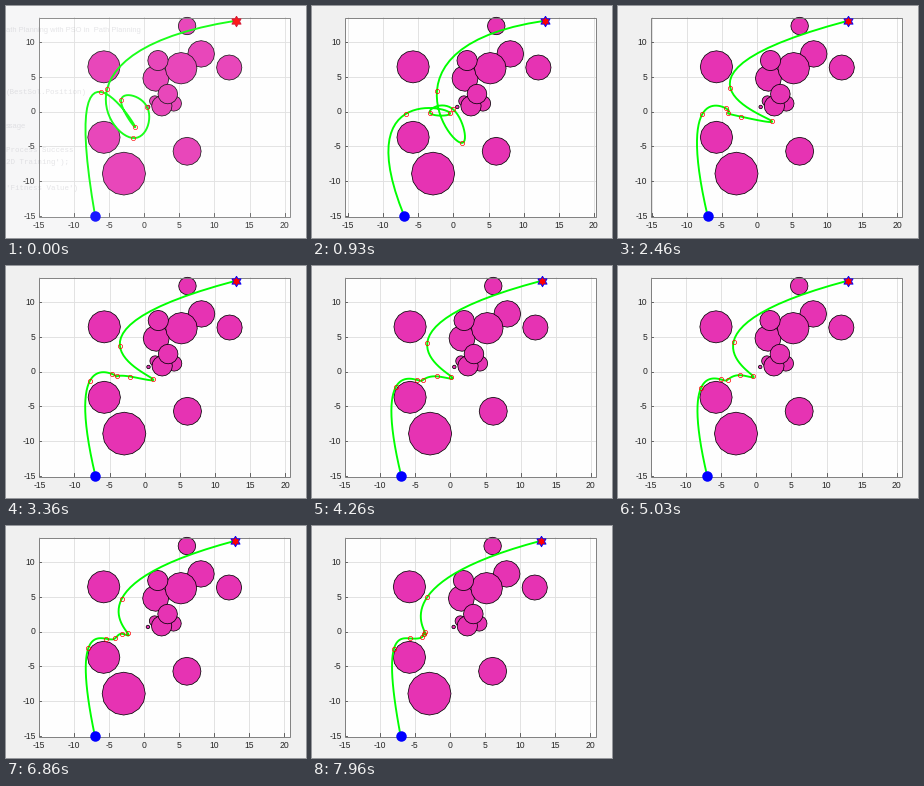
A matplotlib script for the animation above (8 s loop, 300 px wide and 232 px high).

```python
import numpy as np
import matplotlib.pyplot as plt
from matplotlib.animation import FuncAnimation
from matplotlib.patches import Polygon, Rectangle
from matplotlib.transforms import Affine2D

W, H, DPI = 300, 232, 64  # a power of two keeps the pixel size exact
LOOP, STEP = 8000, 20
PX = 72 / DPI
SX, SY, Y0 = 7.02, 6.98, 105.5
LEFT, RIGHT, TOP, BOTTOM = 32.5, 283.5, 11.5, 210.5
START, GOAL = (-7, -15), (13, 13)
PINK, INK = (0.9, 0.2, 0.7), "#262626"

# Obstacles: x, y, radius, from back to front
OBSTACLES = [
    (-5.75, 6.4, 2.3), (-5.75, -3.7, 2.3), (-2.9, -8.9, 3.07),
    (6.1, -5.7, 2.0), (6.1, 12.25, 1.25), (8.1, 8.25, 1.9),
    (12.1, 6.3, 1.8), (1.65, 4.75, 1.85), (5.25, 6.2, 2.25),
    (1.95, 7.3, 1.45), (4.2, 1.15, 1.1), (1.5, 1.5, 0.75),
    (2.5, 0.8, 1.45), (3.35, 2.5, 1.4), (0.55, 0.65, 0.25),
]

# Best way points found by the swarm at a few moments
KEY_TIMES = [0, 930, 1530, 2460, 4260, 5930, 7960]
KEY_POINTS = np.array([
    [(-6.17, 2.8), (-1.3, -2.2), (-3.3, 1.65), (.4, .65), (-1.6, -3.8), (-5.3, 3.2)],
    [(-6.8, -.35), (-.5, -.2), (-3.35, -.2), (-.1, .35), (1.2, -4.5), (-2.35, 2.95)],
    [(-8.5, -1.35), (-1.35, -.35), (-4.35, .2), (-.85, -3.15), (1.15, -4.9), (-4, 2.5)],
    [(-7.75, -.35), (-4.4, .45), (-4.1, -.2), (-2.2, -.75), (2.1, -1.35), (-3.75, 3.3)],
    [(-7.8, -2.25), (-4.8, -1.2), (-3.9, -1.2), (-1.9, -.7), (.15, -.75), (-3.3, 4.1)],
    [(-7.95, -2.4), (-5.4, -1.05), (-4.3, -1.15), (-2.7, -.35), (-1.3, -.4), (-3.2, 4.4)],
    [(-7.95, -2.45), (-5.6, -1.0), (-3.95, -.8), (-3.7, -.3), (-3.55, -.1), (-3.2, 4.95)],
])

# Bursts of iterations: first time, last time, count
BURSTS = [
    (30, 800, 12), (860, 1660, 12), (1730, 2530, 12), (2600, 3100, 8),
    (3360, 3460, 3), (3630, 3960, 6), (4160, 4930, 12), (5000, 5800, 12),
    (5860, 6660, 12), (6730, 7500, 13), (7560, 7960, 7),
]
UPDATES = np.concatenate([np.linspace(*burst) for burst in BURSTS])


def iteration(t):
    return np.searchsorted(UPDATES, t, side="right")


KEY_ITERATIONS = iteration(KEY_TIMES)


def spline_basis(t):
    """Cubic not-a-knot basis for knots 0..7."""
    t = np.asarray(t, float)[:, None]
    return np.hstack([t ** np.arange(4), np.clip(t - np.arange(2, 6), 0, None) ** 3])


SPLINE = spline_basis(np.linspace(0, 7, 100)) @ np.linalg.inv(spline_basis(np.arange(8)))


def way_points(t):
    i = iteration(t)
    flat = KEY_POINTS.reshape(len(KEY_TIMES), -1)
    return np.array([np.interp(i, KEY_ITERATIONS, c) for c in flat.T]).reshape(-1, 2)


def ring(n, radius=1.0, phase=0.0):
    a = phase + np.arange(n) * 2 * np.pi / n
    return np.column_stack([np.cos(a), np.sin(a)]) * np.reshape(radius, (-1, 1))


plt.rcParams["font.family"] = "Liberation Sans"
fig = plt.figure(figsize=(W / DPI, H / DPI), dpi=DPI, facecolor="#f0f0f0")
ax = fig.add_axes([0, 0, 1, 1])
ax.set(xlim=(0, W), ylim=(H, 0))
ax.axis("off")

view = Affine2D()
world = view + ax.transData
frame_box = Rectangle((LEFT, TOP), RIGHT - LEFT, BOTTOM - TOP, fc="#fefefe", ec="none", zorder=0)
ax.add_patch(frame_box)


def line(xs, ys, color, z, **kw):
    return ax.plot(xs, ys, color=color, lw=PX * 0.9, zorder=z, **kw)[0]


def label(x, y, s, **kw):
    return ax.text(x, y, s, fontsize=8.6 * PX, color=INK, va="center", **kw)


# Grid, ticks and labels
x_ticks = []
for v in range(-15, 25, 5):
    parts = [line([v, v], [-15, 13.47], "#dfdfdf", 1, transform=world),
             line([v, v], [-15, -14.6], "#555555", 6, transform=world),
             label(v, -16.3, str(v), ha="center", transform=world)]
    x_ticks.append((v, parts))
for v in range(-15, 15, 5):
    y = Y0 - SY * v
    if v > -15:
        line([LEFT, RIGHT], [y, y], "#dfdfdf", 1)
    line([LEFT, LEFT + 2.5], [y, y], "#555555", 6)
    label(29.5, y + 0.5, str(v), ha="right")
ax.add_patch(Rectangle((LEFT, TOP), RIGHT - LEFT, BOTTOM - TOP, fc="none",
                       ec="#777777", lw=PX * 0.9, zorder=6))

for x, y, r in OBSTACLES:
    ax.add_patch(Polygon(ring(16, r) + (x, y), fc=PINK, ec="black",
                         lw=0.75 * PX, zorder=3, transform=world))

path, = ax.plot([], [], color="#00ff00", lw=1.9 * PX, zorder=4, transform=world)
dots, = ax.plot([], [], "o", mfc="none", mec="red", ms=4.2 * PX, mew=0.7 * PX,
                zorder=5, transform=world)
ax.plot(*START, "o", color="blue", ms=10.5 * PX, mew=0, zorder=7, transform=world)
hexagram = ring(12, np.tile([1, 0.577], 6), np.pi / 2)
goal, = ax.plot(*GOAL, marker=np.vstack([hexagram, hexagram[:1]]), mfc="red", mec="blue",
                ms=10.5 * PX, mew=0.9 * PX, zorder=7, transform=world)

# Editor window still fading out behind the opening view
fade = [ax.add_patch(Rectangle((0, 0), W, H, fc="white", ec="none", alpha=0.1, zorder=9))]
for x, y, s in [(0, 24, "ath Planning with PSO in  Path Planning"),
                (0, 86, "(BestSol.Position)"), (0, 121, "ssage"),
                (0, 145, "Process Success"), (0, 157, "2D Training');"),
                (0, 182, "'Fitness Value')")]:
    font = "Liberation Sans" if y in (24, 121) else "Liberation Mono"
    fade.append(ax.text(x, y, s, fontsize=7.5 * PX, family=font, color="#555566",
                        alpha=0.16, va="center", zorder=2))


def update(n):
    t = n * STEP + STEP / 2
    points = way_points(t)
    curve = SPLINE @ np.vstack([START, points, GOAL])
    path.set_data(*curve.T)
    dots.set_data(*points.T)

    # Equal axes stay centred on everything drawn
    centre = (13.9 + min(curve[:, 0].min(), -8.05)) / 2
    x0 = 157.7 - SX * centre
    view.clear().scale(SX, -SY).translate(x0, Y0)
    for v, parts in x_ticks:
        shown = LEFT - 1.5 <= x0 + SX * v <= RIGHT + 0.5
        for part in parts:
            part.set_visible(shown)

    opening = t < UPDATES[0]
    for part in fade:
        part.set_visible(opening)
    fig.set_facecolor("#f6f6f7" if opening else "#f0f0f0")
    goal.set_markeredgecolor("#d00020" if opening else "blue")
    return []


anim = FuncAnimation(fig, update, frames=LOOP // STEP, interval=STEP,
                     init_func=lambda: [], repeat=True, repeat_delay=0)
plt.show()
```
